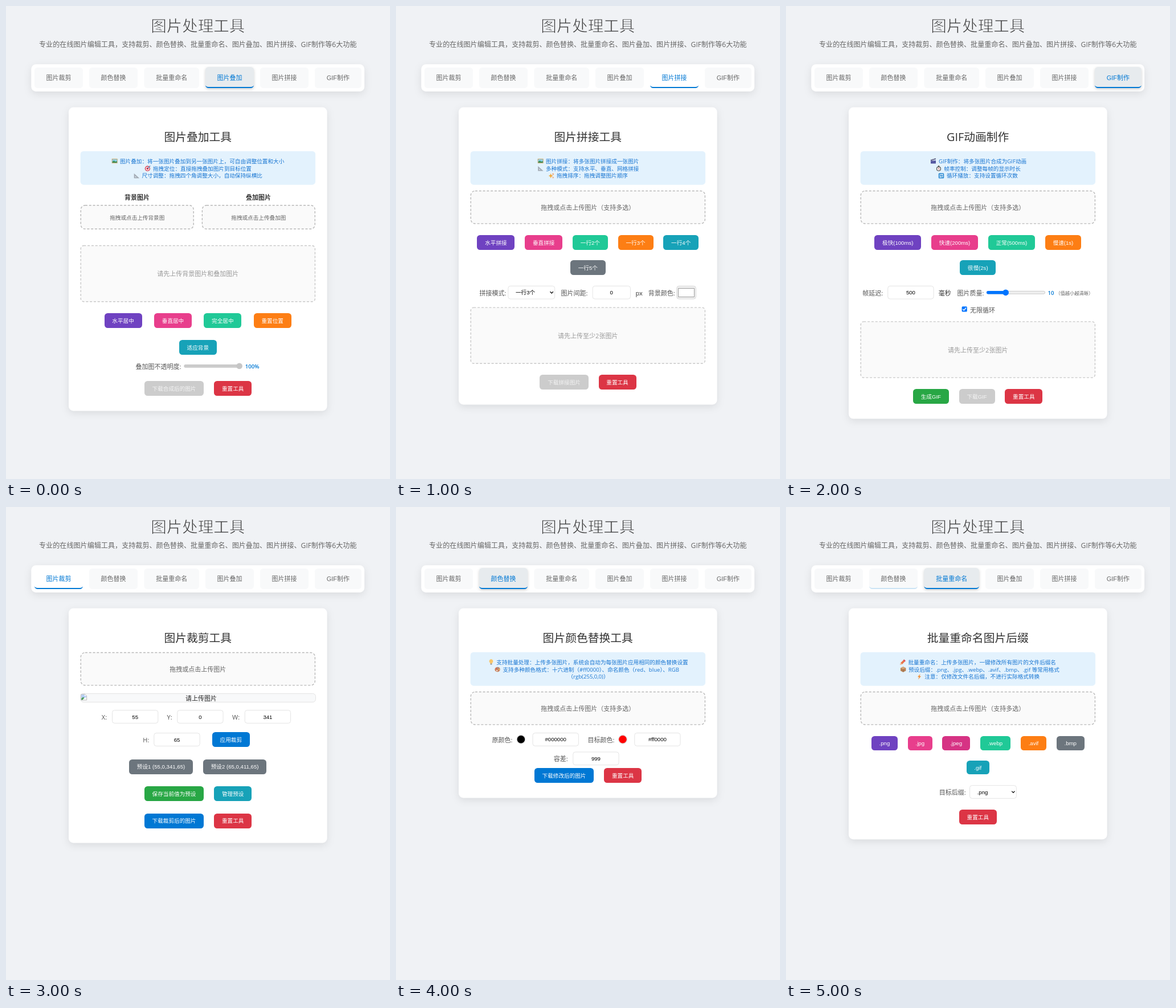
Animation of 674x830 px, one loop 6 s. Source, as an HTML page:

```html
<!DOCTYPE html>
<html lang="zh-CN">
<head>
<meta charset="utf-8">
<title>图片处理工具</title>
<style>
html, body { margin: 0; width: 100%; height: 100%; overflow: hidden; background: #f0f2f5; }
svg { display: block; width: 674px; height: 830px; }
text { font-family: "Open Sans", "Noto Sans CJK SC", "Noto Sans CJK", sans-serif; white-space: pre; }
.control { font-family: "Liberation Sans", "Noto Sans CJK SC", "Noto Sans CJK", sans-serif; }
.thin { font-weight: 300; stroke: #f0f2f5; stroke-width: .8px; }
.panel { filter: drop-shadow(0 4px 7px rgba(0, 0, 0, .09)); }
.raised { filter: drop-shadow(0 2px 2.5px rgba(0, 0, 0, .18)); }
</style>
</head>
<body>
<svg id="stage" viewBox="0 0 674 830"></svg>
<script>
const BLUE = '#0078d4', PURPLE = '#6f42c1', PINK = '#e83e8c', TEAL = '#20c997', ORANGE = '#fd7e14',
  CYAN = '#17a2b8', GRAY = '#6c757d', RED = '#dc3545', GREEN = '#28a745', OFF = '#cccccc';
const SMALL = 9.625, BODY = 11, MID = 336.75;

// Text is placed by its visual middle line.
const text = (s, x, y, size, fill, attrs = '') =>
  `<text x="${x}" y="${y + size * 0.38}" font-size="${size}" fill="${fill}" ${attrs}>${s}</text>`;
const centered = (s, x, y, size, fill, attrs = '') =>
  text(s, x, y, size, fill, 'text-anchor="middle" ' + attrs);
const rect = (x, y, w, h, r, fill, attrs = '') =>
  `<rect x="${x}" y="${y}" width="${w}" height="${h}" rx="${r}" fill="${fill}" ${attrs}/>`;
const circle = (x, y, r, fill, attrs = '') => `<circle cx="${x}" cy="${y}" r="${r}" fill="${fill}" ${attrs}/>`;
const path = (d, fill, attrs = '') => `<path d="${d}" fill="${fill}" ${attrs}/>`;
const line = (d, color, width) => path(d, 'none', `stroke="${color}" stroke-width="${width}"`);

// A box whose edges fall on whole pixels.
function snapped(x, y, w, h, r, fill, attrs) {
  const left = Math.round(x), top = Math.round(y);
  return rect(left, top, Math.round(x + w) - left, Math.round(y + h) - top, r, fill, attrs);
}

const label = (s, x, y, fill = '#555') => text(s, x, y, BODY, fill);
const value = (s, x, y) => text(s, x, y, SMALL, BLUE, 'font-weight="600"');
const heading = s => centered(s, MID, 229, 19.8, '#333');
const button = (s, x, y, w, fill, h = 26) => snapped(x, y, w, h, 5.5, fill) +
  centered(s, x + w / 2, y + h / 2 + 0.2, SMALL, fill === OFF ? '#f4f4f4' : '#fff', 'class="control"');
const reset = (x, y) => button('重置工具', x, y, 66, RED);
const frame = (x, y, w, h = 23.4) => rect(x + 0.35, y + 0.35, w - 0.7, h - 0.7, 4, '#fff', 'stroke="#ddd" stroke-width=".8"');
const input = (s, x, y, w = 81) => frame(x, y, w) +
  centered(s, x + w / 2, y + 11.6, SMALL, '#000', 'class="control"');
const select = (s, x, y) => frame(x, y, 82.5) + text(s, x + 13.5, y + 11.7, SMALL, '#000', 'class="control"') +
  line(`M${x + 74} ${y + 10.3}l2.7 2.7l2.7-2.7`, '#111', 1.3);
const dashed = (x, y, w, h, r, color) => rect(x + 0.7, y + 0.7, w - 1.4, h - 1.4, r, '#fafafa',
  `stroke="${color}" stroke-width="1.4" stroke-dasharray="4.1 2.7"`);
const dropZone = (s, x, y, w, h, size) => dashed(x, y, w, h, 7.6, '#b9b9b9') +
  centered(s, x + w / 2, y + h / 2 + 0.5, size, '#666');
const uploadMany = () => dropZone('拖拽或点击上传图片（支持多选）', 130.6, 323.8, 412.5, 58.8, BODY);
const preview = (s, y) => dashed(130.6, y, 412.5, 99.6, 5, '#c9c9c9') +
  centered(s, MID, y + 50.2, BODY, '#999');
const swatch = (x, y, fill) => circle(x, y, 7.4, fill, 'stroke="#ddd" stroke-width="1.2"');

// Small pictograms on a 10 by 10 grid.
const icons = {
  picture: rect(0, 1, 10, 8, 0.5, '#c9a76a') + rect(1, 2, 8, 6, 0, '#8fd0ee') + path('M1 8V6l3-2 2 2 3-1v3z', '#3f8f5a'),
  target: circle(4.7, 5.3, 4.6, '#d9344a') + circle(4.7, 5.3, 3.2, '#fff') + circle(4.7, 5.3, 1.9, '#d9344a') +
    line('M4.7 5.3L9.5.5', '#3c7fb5', 1.2),
  ruler: path('M.5 1V9.5H10zM2.5 5.3V7.6H5z', '#a3abb5', 'fill-rule="evenodd"'),
  sparkles: path('M4 1l1.2 3L8 5.3 5.2 6.4 4 9.5 2.8 6.4 0 5.3 2.8 4z', '#f2a93b') +
    path('M8 0l.6 1.6L10 2.2l-1.4.6L8 4.4l-.6-1.6L6 2.2l1.4-.6zM8 6.5l.5 1.2 1.3.5-1.3.5L8 10l-.5-1.3-1.2-.5 1.2-.5z', '#ef8b4d'),
  clapper: rect(0.3, 4, 9, 5.5, 0.6, '#5457a0') + path('M.2 2.8L8.8.3l.5 1.8L.7 4.4z', '#45466f') +
    line('M2 2.3l1.6 1.3M5 1.4l1.6 1.3M2 5.2l1.3-1.2M5 5.2l1.3-1.2', '#fff', 0.8),
  stopwatch: rect(3.8, 0, 2.4, 2, 0.5, '#555') + circle(5, 5.8, 4.1, '#555') + circle(5, 5.8, 2.9, '#eee') +
    line('M5 3.7V6l1.3 1', '#c33', 0.8),
  repeat: rect(0, 0.5, 9.6, 9.2, 1.5, '#3b93d6') + line('M2.3 5V3.2h4.4M7.3 5v2H3', '#fff', 1) +
    path('M6 1.5l2.2 1.7L6 4.8zM3.7 5.4L1.5 7l2.2 1.7z', '#fff'),
  bulb: path('M5 0a3.5 3.5 0 0 1 2 6.3L6.5 8h-3L3 6.3A3.5 3.5 0 0 1 5 0z', '#f8c66a') + rect(3.5, 7.5, 3, 2.3, 0.7, '#9b9b9b'),
  palette: path('M5 .8C8.5.5 10.5 4 9 7S3 10 1 7.5 1 1 5 .8z', '#c98562') + circle(3, 3.8, 0.9, '#e14b4b') +
    circle(6, 2.7, 0.9, '#5aa1d6') + circle(7.7, 5, 0.9, '#f3cf55') + circle(4, 7, 1, '#fff'),
  pencil: path('M0 9.8l1.2-3.6L7 .5l2.6 2.6L3.7 9z', '#e8744a') + path('M0 9.8l1.2-3.6L3.7 9z', '#f1c9a0') +
    path('M7 .5l2.6 2.6-1.2 1.2-2.6-2.6z', '#d9466a'),
  parcel: path('M5 .3l4.7 2.3v5L5 9.8.3 7.6v-5z', '#b58156') + path('M5 .3l4.7 2.3L5 4.8.3 2.6z', '#d4a679') +
    line('M5 4.8v5', '#8d5d3a', 0.7),
  bolt: path('M6.8 0L2 5.5h2.6L3 10l5-6H5.3z', '#f28a2e')
};
const info = rows => rect(130.6, 254.7, 412.5, 59, 5.5, '#e3f2fd') + rows.map(([icon, s, x], i) => {
  const y = 272 + i * 12.9;
  return (icon ? `<g transform="translate(${x - 14.3} ${y - 5})">${icons[icon]}</g>` : '') +
    text(s, x, y, SMALL, '#1976d2');
}).join('');

const tabs = [['图片裁剪', 50, 85], ['颜色替换', 146, 85], ['批量重命名', 242.4, 96.5],
  ['图片叠加', 350, 85], ['图片拼接', 446, 85], ['GIF制作', 542, 81.8]];

function tab([name, x, w], state, underline) {
  const raised = state === 'hover', y = raised ? 107 : 108, bottom = 144, flat = w - 11;
  const fill = raised ? '#e7ebee' : state === 'active' ? '#fff' : '#f8f9fa';
  const edge = underline && path(`M${x} ${bottom - 5.5}a5.5 5.5 0 0 0 5.5 5.5h${flat}a5.5 5.5 0 0 0 5.5-5.5` +
    `a5.5 3.45 0 0 1-5.5 3.45h${-flat}a5.5 3.45 0 0 1-5.5-3.45z`, underline);
  return rect(x, y, w, bottom - y, 5.5, fill, raised ? 'class="raised"' : '') + (edge || '') +
    centered(name, x + w / 2, raised ? 125.5 : 126, BODY, state ? BLUE : '#666', 'class="control"');
}

// fading: index of a tab whose underline is still disappearing.
const scene = ({ active, hover, fading, bottom, body }) =>
  tabs.map((t, i) => i === active ? tab(t, hover ? 'hover' : 'active', BLUE) : tab(t, '', i === fading && '#cbe4f5')).join('') +
  rect(110, 177.8, 453.6, bottom - 177.8, 8.25, '#fff', 'class="panel"') + body.join('');

const scenes = [
  { active: 3, hover: true, bottom: 710.5, body: [
    heading('图片叠加工具'),
    info([['picture', '图片叠加：将一张图片叠加到另一张图片上，可自由调整位置和大小', 200],
      ['target', '拖拽定位：直接拖拽叠加图片到目标位置', 258],
      ['ruler', '尺寸调整：拖拽四个角调整大小，自动保持纵横比', 238.5]]),
    centered('背景图片', 230, 336, BODY, '#333', 'font-weight="700"'),
    centered('叠加图片', 443, 336, BODY, '#333', 'font-weight="700"'),
    dropZone('拖拽或点击上传背景图', 130.6, 349, 199.3, 43, SMALL),
    dropZone('拖拽或点击上传叠加图', 343.7, 349, 199.3, 43, SMALL),
    preview('请先上传背景图片和叠加图片', 419.8),
    button('水平居中', 172.6, 539, 66, PURPLE), button('垂直居中', 260, 539, 66, PINK),
    button('完全居中', 347.3, 539, 66, TEAL), button('重置位置', 434.7, 539, 66, ORANGE),
    button('适应背景', 303.8, 586, 66, CYAN),
    label('叠加图不透明度:', 227.5, 632.5),
    rect(312.3, 628.9, 102, 5.8, 2.9, '#cbcbcb'), circle(409.6, 631.8, 5.3, '#c6c6c6'),
    value('100%', 419.8, 632.8),
    button('下载合成后的图片', 242.8, 658.4, 104.5, OFF), reset(365.2, 658.4)] },

  { active: 4, bottom: 699.5, body: [
    heading('图片拼接工具'),
    info([['picture', '图片拼接：将多张图片拼接成一张图片', 263],
      ['ruler', '多种模式：支持水平、垂直、网格拼接', 263],
      ['sparkles', '拖拽排序：拖拽调整图片顺序', 282]]),
    uploadMany(),
    button('水平拼接', 142.4, 402, 66, PURPLE), button('垂直拼接', 226.2, 402, 66, PINK),
    button('一行2个', 310, 402, 61.8, TEAL), button('一行3个', 389.7, 402, 61.8, ORANGE),
    button('一行4个', 469.3, 402, 61.8, CYAN), button('一行5个', 305.9, 446, 61.8, GRAY),
    label('拼接模式:', 146.5, 503.5), select('一行3个', 196.5, 491),
    label('图片间距:', 289.5, 503.5), input('0', 344.8, 491, 67), label('px', 420.5, 503.5, '#333'),
    label('背景颜色:', 442.7, 503.5),
    rect(492.7, 491.3, 33.7, 22.8, 4, '#efefef', 'stroke="#d4d4d4" stroke-width=".8"'),
    rect(495.6, 495.6, 27.8, 14.8, 0, '#fff', 'stroke="#888" stroke-width=".8"'),
    preview('请先上传至少2张图片', 528.4),
    button('下载拼接图片', 252.4, 647.4, 85.3, OFF), reset(355.5, 647.4)] },

  { active: 5, hover: true, bottom: 724.3, body: [
    heading('GIF动画制作'),
    info([['clapper', 'GIF制作：将多张图片合成为GIF动画', 268],
      ['stopwatch', '帧率控制：调整每帧的显示时长', 277.3],
      ['repeat', '循环播放：支持设置循环次数', 282]]),
    uploadMany(),
    button('极快(100ms)', 155.2, 402, 82.1, PURPLE), button('快速(200ms)', 255, 402, 82.1, PINK),
    button('正常(500ms)', 354.9, 402, 82.1, TEAL), button('慢速(1s)', 454.8, 402, 63.3, ORANGE),
    button('很慢(2s)', 305.1, 446, 63.3, CYAN),
    label('帧延迟:', 134.3, 503.5), input('500', 178.4, 491), label('毫秒', 267.7, 503.5, '#333'),
    label('图片质量:', 300.5, 503.5),
    rect(352.3, 500.4, 102.3, 4.8, 2.4, '#efefef', 'stroke="#b8b8b8" stroke-width=".7"'),
    rect(352, 500, 34, 5.5, 2.75, '#0075ff'), circle(385.6, 502.8, 5.4, '#0075ff'),
    value('10', 459.5, 503.8), text('（值越小越清晰）', 473.2, 503.5, 8.25, '#666'),
    rect(308.6, 527.2, 9.2, 9.2, 1.5, '#0075ff'), line('M310.3 531.9l2 2l3.8-4.4', '#fff', 1.4),
    label('无限循环', 323, 533.4),
    preview('请先上传至少2张图片', 553.2),
    button('生成GIF', 222.9, 672, 62.9, GREEN), button('下载GIF', 303.6, 672, 62.9, OFF), reset(384.3, 672)] },

  { active: 0, bottom: 589.5, body: [
    heading('图片裁剪工具'),
    dropZone('拖拽或点击上传图片', 130.6, 254.8, 412.5, 58.8, BODY),
    rect(130.9, 327.4, 412.6, 15, 5, '#f8f9fa', 'stroke="#ddd" stroke-width=".8"'),
    path('M131.8 328.6h7l2.8 2.8v7.4h-9.8z', '#fff', 'stroke="#aaa" stroke-width=".8"'),
    path('M132.3 329.2h5.5v2.4h3.2v2l-4 2-4.7 2.6z', '#b5cdf3'),
    path('M132.3 338.4v-2.5l3-2.4 2.2 1.5-3.2 3.4z', '#4b9b58'),
    centered('请上传图片', 342.6, 335.6, BODY, '#222'),
    label('X:', 167.8, 368.8), input('55', 186.2, 356.3),
    label('Y:', 282.5, 368.8), input('0', 300.4, 356.3),
    label('W:', 397, 368.8), input('341', 418.9, 356.3),
    label('H:', 240.3, 408.8), input('65', 259.5, 396.4), button('应用裁剪', 361.8, 395, 66, BLUE),
    button('预设1 (55,0,341,65)', 216.2, 442.6, 111.6, GRAY),
    button('预设2 (65,0,411,65)', 345.8, 442.6, 111.6, GRAY),
    button('保存当前值为预设', 242.8, 490, 104.5, GREEN), button('管理预设', 365.2, 490, 66, CYAN),
    button('下载裁剪后的图片', 242.8, 537.5, 104.5, BLUE), reset(365.2, 537.5)] },

  { active: 1, hover: true, bottom: 510.5, body: [
    heading('图片颜色替换工具'),
    info([['bulb', '支持批量处理：上传多张图片，系统会自动为每张图片应用相同的颜色替换设置', 176.3],
      ['palette', '支持多种颜色格式：十六进制（#ff0000）、命名颜色（red、blue）、RGB', 187.5],
      ['', '（rgb(255,0,0)）', 301.5]]),
    uploadMany(),
    label('原颜色:', 168.4, 408.4), swatch(219.4, 407.8, '#000'), input('#000000', 239.7, 396.2),
    label('目标颜色:', 336.6, 408.4), swatch(398, 407.8, '#f00'), input('#ff0000', 418.4, 396.2),
    label('容差:', 276.7, 441.8), input('999', 310.4, 429.6),
    button('下载修改后的图片', 242.8, 458.3, 104.5, BLUE), reset(365.2, 458.3)] },

  { active: 2, hover: true, fading: 1, bottom: 583.2, body: [
    heading('批量重命名图片后缀'),
    info([['pencil', '批量重命名：上传多张图片，一键修改所有图片的文件后缀名', 214.5],
      ['parcel', '预设后缀：.png、.jpg、.webp、.avif、.bmp、.gif 等常用格式', 215],
      ['bolt', '注意：仅修改文件名后缀，不进行实际格式转换', 243.3]]),
    uploadMany(),
    ...[['.png', 149.8, 46.3, PURPLE], ['.jpg', 213.9, 42.7, PINK], ['.jpeg', 274.4, 48.4, '#d63384'],
      ['.webp', 340.6, 53.3, TEAL], ['.avif', 411.7, 45.5, ORANGE], ['.bmp', 475, 48.5, GRAY]]
      .map(([s, x, w, fill]) => button(s, x, 402, w, fill, 24.5)),
    button('.gif', 316.6, 444.5, 40.2, CYAN, 24.5),
    label('目标后缀:', 268.8, 501), select('.png', 322.2, 488.3),
    reset(303.8, 531)] }
];

const stage = document.getElementById('stage');
stage.innerHTML = rect(0, 0, 674, 830, 0, '#f0f2f5') +
  centered('图片处理工具', MID, 34.5, 27.5, '#333', 'class="thin"') +
  centered('专业的在线图片编辑工具，支持裁剪、颜色替换、批量重命名、图片叠加、图片拼接、GIF制作等6大功能', MID, 67.3, 12.1, '#666') +
  rect(44.3, 102.3, 584.8, 47.6, 8.25, '#fff', 'class="panel"') +
  scenes.map(s => `<g class="scene" visibility="hidden">${scene(s)}</g>`).join('');
const groups = stage.querySelectorAll('.scene');

function draw() {
  const current = Math.floor(performance.now() / 1000) % scenes.length;
  groups.forEach((g, i) => g.setAttribute('visibility', i === current ? 'visible' : 'hidden'));
  requestAnimationFrame(draw);
}
draw();
</script>
</body>
</html>
```
